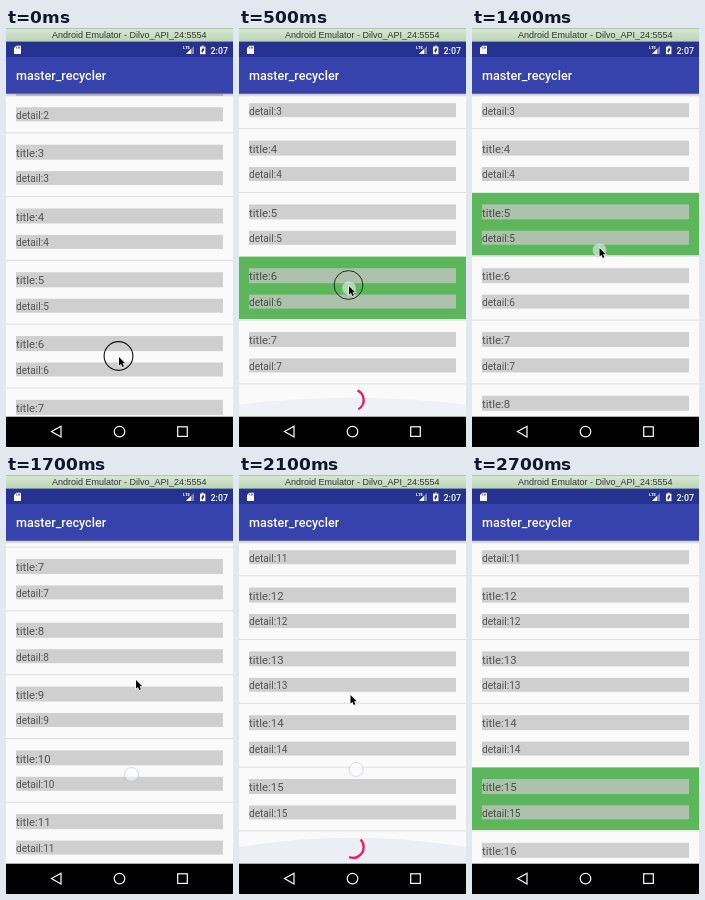
Write an HTML page with a canvas that moves like this. It is 227 by 419 pixels and loops after 2.8 s.

```html
<!DOCTYPE html>
<html lang="en">
<head>
<meta charset="utf-8">
<title>Recycler list</title>
<style>
html, body { margin: 0; width: 227px; height: 419px; overflow: hidden; }
canvas { display: block; }
</style>
</head>
<body>
<canvas id="stage" width="227" height="419"></canvas>
<script>
const g = document.getElementById('stage').getContext('2d');
const LOOP = 2800, STEP = 100, W = 227;
const ROW = 63.8, FIRST_TOP = 100.6;
const LIST_TOP = 65.5, LIST_BOTTOM = 388.7, NAV_Y = 403.6;
const NAVY = '#27318f';

const ramp = (t, from, to) => Math.min(1, Math.max(0, (t - from) / (to - from)));
const between = (t, from, to) => t >= from && t < to;

// Rows scrolled: a short drag, then an accelerating fling
const scrollAt = t => ramp(t, 0, 500) - 1 - 0.064 * (1 - ramp(t, 0, 500))
  + 8 * ramp(t, 1400, 2000) ** 1.214;

// The cursor glides between a few stops
function cursorAt(t) {
  const stops = [[0, 113, 329], [500, 110, 258], [1100, 125, 235],
    [1700, 130, 205], [2100, 111.5, 220], [2500, 117, 300]];
  let [, x, y] = stops[0];
  for (const [i, [end, nx, ny]] of stops.entries()) {
    const f = i ? ramp(t, stops[i - 1][0], end) : 0;
    x += (nx - x) * f;
    y += (ny - y) * f;
  }
  return [x, y];
}

function rect(x, y, w, h, color) {
  g.fillStyle = color;
  g.fillRect(x, y, w, h);
}

function text(str, x, y, font, color) {
  g.font = font;
  g.fillStyle = color;
  g.fillText(str, x, y);
}

function poly(points) {
  g.beginPath();
  points.forEach(([x, y]) => g.lineTo(x, y));
  g.closePath();
}

function arc(x, y, r, from = 0, to = 360) {
  g.beginPath();
  g.arc(x, y, r, from * Math.PI / 180, to * Math.PI / 180);
}

function fill(color) {
  g.fillStyle = color;
  g.fill();
}

function stroke(color, width) {
  g.strokeStyle = color;
  g.lineWidth = width;
  g.stroke();
}

function fade(y, h, from, to) {
  const gradient = g.createLinearGradient(0, y, 0, y + h);
  gradient.addColorStop(0, from);
  gradient.addColorStop(1, to);
  rect(0, y, W, h, gradient);
}

function drawRow(n, top, selected) {
  if (selected) rect(0, top + 0.4, W, ROW - 1.2, '#5cb75c');
  else rect(0, top - 0.4, W, 1, '#dedede');
  const bar = 'rgba(196,196,196,.79)', ink = 'rgba(0,0,0,.6)';
  rect(10, top + 12, 207, 15, bar);
  rect(10, top + 38.4, 207, 14, bar);
  text('title:' + n, 10, top + 24.2, '11.4px Roboto, sans-serif', ink);
  text('detail:' + n, 10, top + 49.8, '10.1px Roboto, sans-serif', ink);
}

function drawGlow(height) {
  const top = LIST_BOTTOM - height, edge = top + height * 0.36;
  g.beginPath();
  g.moveTo(0, LIST_BOTTOM);
  g.lineTo(0, edge);
  g.quadraticCurveTo(W / 2, 2 * top - edge, W, edge);
  g.lineTo(W, LIST_BOTTOM);
  fill(`rgba(70,110,180,${height * 0.0032})`);
}

function drawFooter(top, t) {
  rect(0, top - 0.4, W, 1, '#dedede');
  const from = -65 + 0.4625 * (t - 500);
  arc(114, top + 16.3, 10.7, from, from + 125 + 0.02 * (t - 500));
  stroke('#ec1f66', 2.3);
}

function drawList(t) {
  const pos = scrollAt(t);
  const last = t < 700 ? 7 : t < 2300 ? 15 : 23;
  const selected = between(t, 300, 1300) ? 6 : between(t, 1300, 1700) ? 5 : t >= 2300 ? 15 : 0;
  const topOf = n => FIRST_TOP + ROW * (n - 4 - pos);
  rect(0, LIST_TOP, W, LIST_BOTTOM, '#fafafa');
  if (between(t, 500, 700)) drawGlow(19);
  if (between(t, 2000, 2300)) drawGlow(26);
  for (let n = 1; n <= last; n++) drawRow(n, topOf(n), n === selected);
  drawFooter(topOf(last + 1), t);
}

function drawHeader() {
  fade(0, 14, '#d8e9d3', '#bad3b6');
  rect(0, 0, W, 0.5, '#8f9f8c');
  text('Android Emulator - Dilvo_API_24:5554', 46, 10, '9px "Liberation Sans", sans-serif', '#333');

  rect(0, 13.6, W, 16, NAVY);
  rect(0, 29, W, LIST_TOP - 29, '#3643ad');
  fade(LIST_TOP, 3.5, 'rgba(0,0,0,.25)', 'rgba(0,0,0,0)');
  text('master_recycler', 10, 52, '500 12.6px Roboto, sans-serif', '#fff');
  text('2:07', 204.5, 25.5, '500 8.9px Roboto, sans-serif', '#fff');
  text('LTE', 177, 21, '700 4.3px Roboto, sans-serif', '#fff');

  // Memory card
  poly([[10.3, 17.7], [15, 17.7], [15, 26], [8, 26], [8, 20]]);
  fill('#fff');
  for (let i = 0; i < 3; i++) rect(10.4 + 1.5 * i, 18.6, 0.7, 2, NAVY);

  // Signal: a dim triangle, partly filled
  for (const [size, color] of [[8, 'rgba(255,255,255,.4)'], [5, '#fff']]) {
    poly([[180, 26], [180 + size, 26], [180 + size, 26 - size]]);
    fill(color);
  }

  // Battery
  rect(194, 18.6, 5.4, 7.6, '#fff');
  rect(195.7, 17.6, 2, 1, '#fff');
  poly([[197.2, 19.6], [195.2, 22.8], [196.2, 25], [198.2, 21.8]]);
  fill(NAVY);
}

function drawNavigation() {
  rect(0, LIST_BOTTOM, W, 31, '#000');
  poly([[45.5, NAV_Y], [55, NAV_Y - 5.3], [55, NAV_Y + 5.3]]);
  stroke('#fff', 1.2);
  arc(113.5, NAV_Y, 5.3);
  stroke('#fff', 1.2);
  g.strokeRect(171.7, NAV_Y - 4.8, 9.6, 9.6);
}

function drawPointer(t) {
  const [x, y] = cursorAt(t);
  if (between(t, 300, 2400)) {
    // The touch spot trails the cursor, then rests low during the fling
    const rest = t - 1700;
    if (t < 1500) arc(x, y + 2, 7);
    else arc(125.5 - 0.021 * rest, 299.5 - 0.0125 * rest, 7);
    fill('rgba(255,255,255,.5)');
    stroke('rgba(130,145,190,.35)', 0.9);
  }
  if (t <= 500) {
    arc(x - 0.5, y - 1, 14.4);
    stroke('#111', 1.1 - 0.0005 * t);
  }
  if (t < 2500) {
    poly([[0, 0], [0, 8.6], [2, 6.9], [3.3, 9.9], [4.9, 9.2], [3.6, 6.3], [6.2, 6.2]]
      .map(([dx, dy]) => [x + dx, y + dy]));
    stroke('#fff', 1.2);
    fill('#000');
  }
}

function draw() {
  const t = Math.floor(performance.now() % LOOP / STEP) * STEP;
  drawList(t);
  drawHeader();
  drawNavigation();
  drawPointer(t);
  requestAnimationFrame(draw);
}
draw();
</script>
</body>
</html>
```
